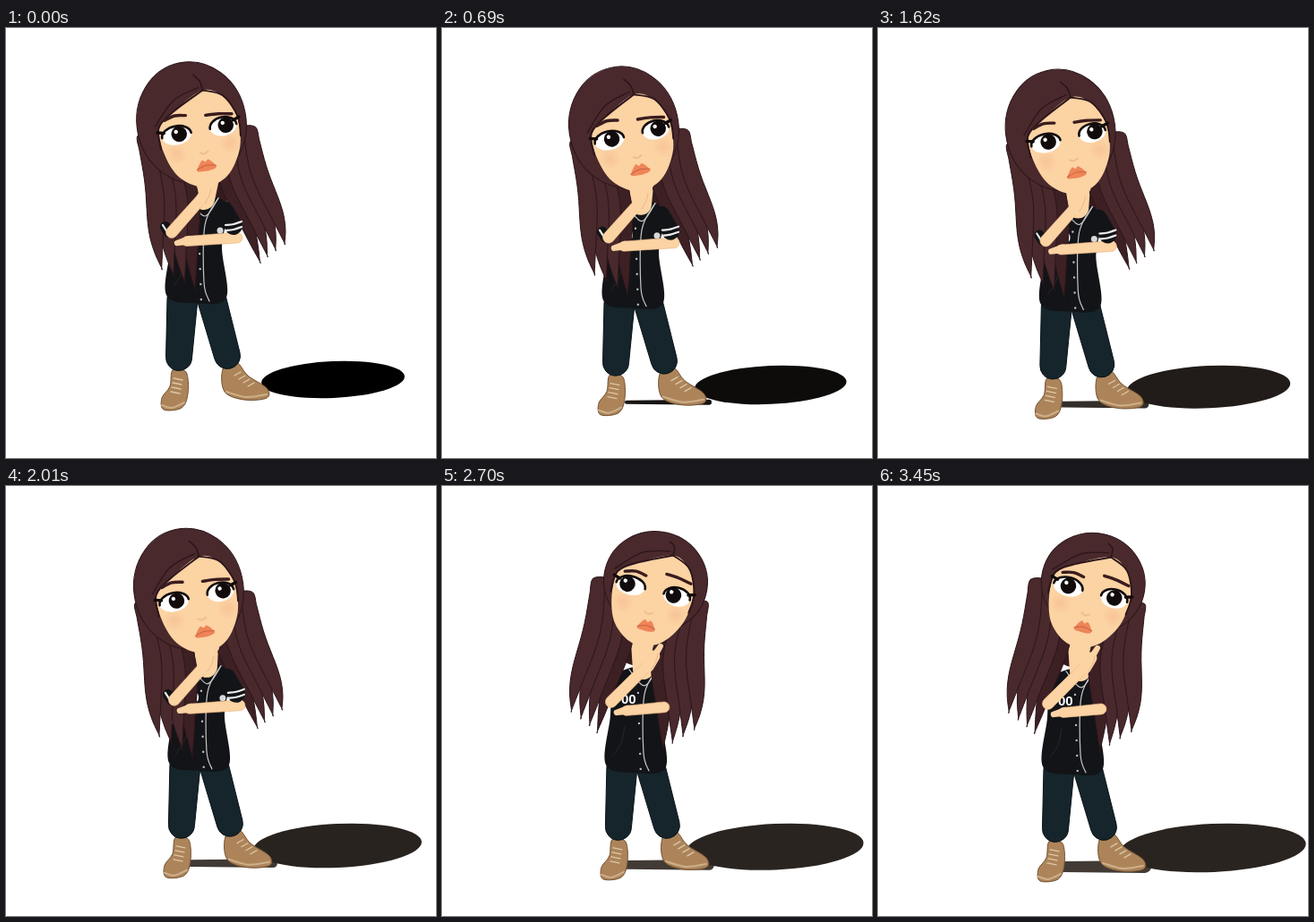
These frames come from a looping animation (480 px wide and 480 px high, 3.48 s). An HTML page with a canvas:

```html
<!DOCTYPE html>
<html lang="en">
<head>
<meta charset="utf-8">
<title>Thinking</title>
<style>
html, body { margin: 0; width: 100%; height: 100%; overflow: hidden; background: #fff; }
canvas { display: block; width: 480px; height: 480px; }
</style>
</head>
<body>
<canvas id="stage" width="480" height="480"></canvas>
<script>
const ctx = document.getElementById("stage").getContext("2d");
const LOOP = 3480, STEP = 30;

const SKIN = "#fcd3a3", SKIN_EDGE = "#e6b585", HAIR = "#49292c", HAIR_DARK = "#2b151a";
const SHIRT = "#131417", PANTS = "#15252b", SHOE = "#ad8459", SHOE_DARK = "#725234";
const INK = "#110b0c";

const lerp = (a, b, k) => a + (b - a) * k;
function ease(t, from, to) {
  const k = Math.max(0, Math.min(1, (t - from) / (to - from)));
  return k * k * (3 - 2 * k);
}

// She sinks and sways slowly, then turns her head to the other side.
function poseAt(t) {
  const p = t / LOOP;
  const sink = 15 * Math.pow(p, 0.6);
  const sway = 2 * Math.cos(2 * Math.PI * t / 1200);
  const turn = ease(t, 2110, 2720);
  const mid = Math.sin(Math.PI * turn);
  return {
    p, turn,
    bodyX: 5 * p, bodyY: sink - 6,
    x: 214 + 22 * turn * turn + sway,
    y: 115 + 0.85 * sink - 8.6 * turn,
    tilt: (-12 + 26 * turn + 0.5 * sway) * Math.PI / 180,
    gaze: 3 - 7 * turn + 4 * ease(t, 3000, LOOP),
    browL: -21 + 5 * turn + 5 * mid,
    browR: -15 - 6 * turn
  };
}

function fromHead(pose, x, y) {
  const c = Math.cos(pose.tilt), s = Math.sin(pose.tilt);
  return [pose.x + x * c - y * s, pose.y + x * s + y * c];
}

function paint(fill, stroke, width = 1) {
  if (fill) { ctx.fillStyle = fill; ctx.fill(); }
  if (stroke) { ctx.strokeStyle = stroke; ctx.lineWidth = width; ctx.stroke(); }
}

// Smooth path through every point.
function trace(p, closed) {
  const n = p.length / 2;
  const at = i => {
    const j = closed ? (i + n) % n : Math.max(0, Math.min(n - 1, i));
    return [p[2 * j], p[2 * j + 1]];
  };
  ctx.beginPath();
  ctx.moveTo(p[0], p[1]);
  for (let i = 0; i < (closed ? n : n - 1); i++) {
    const [a, b, c, d] = [at(i - 1), at(i), at(i + 1), at(i + 2)];
    ctx.bezierCurveTo(b[0] + (c[0] - a[0]) / 6, b[1] + (c[1] - a[1]) / 6,
      c[0] - (d[0] - b[0]) / 6, c[1] - (d[1] - b[1]) / 6, c[0], c[1]);
  }
  if (closed) ctx.closePath();
}

function shape(p, fill, stroke, width) { trace(p, true); paint(fill, stroke, width); }
function line(p, color, width) { trace(p, false); paint(null, color, width); }
function oval(x, y, rx, ry, fill, stroke, width, turn = 0) {
  ctx.beginPath();
  ctx.ellipse(x, y, rx, ry, turn, 0, Math.PI * 2);
  paint(fill, stroke, width);
}

// Tapered capsule from one round end to the other.
function limb(x1, y1, r1, x2, y2, r2, fill, stroke, width) {
  const a = Math.atan2(y2 - y1, x2 - x1), q = Math.PI / 2;
  ctx.beginPath();
  ctx.arc(x1, y1, r1, a + q, a + 3 * q);
  ctx.arc(x2, y2, r2, a - q, a + q);
  ctx.closePath();
  paint(fill, stroke, width);
}

function drawShadow({ p }) {
  const warm = Math.min(1, p * 1.7);
  const shade = (r, g, b) => `rgb(${r * warm},${g * warm},${b * warm})`;
  if (p > 0.03) {
    const y = 416 + 9 * p, r = 1 + 5 * p;
    limb(206, y, r, 298, y, r + 1, shade(66, 58, 53));
  }
  const left = 285 - 15 * p, right = 445 + 33 * p;
  const top = 372 + 5 * Math.min(1, p * 5), bottom = 413 + 18 * Math.pow(p, 0.6);
  oval((left + right) / 2, (top + bottom) / 2, (right - left) / 2, (bottom - top) / 2,
    shade(42, 36, 32), null, 0, -0.045);
}

function drawShoes() {
  shape([186,388, 201,390, 203,414, 196,430, 176,432, 174,419, 183,406], SHOE, SHOE_DARK);
  line([174,427, 185,430, 199,424], "#cdb08a", 2);
  shape([242,387, 257,379, 270,394, 291,408, 291,419, 266,421, 244,412], SHOE, SHOE_DARK);
  line([246,412, 268,418, 291,415], "#cdb08a", 2);
  for (let i = 0; i < 4; i++) {
    line([187 - i, 397 + i * 5, 197 - i, 399 + i * 5], "#dcc9aa", 1.3);
    line([255 + i * 5, 394 + i * 4, 262 + i * 5, 390 + i * 4], "#dcc9aa", 1.3);
  }
}

function drawBody({ turn }) {
  drawShoes();
  limb(197, 308, 17, 193, 374, 14.5, PANTS, "#0a1317");
  limb(230, 310, 16, 247, 372, 14.5, PANTS, "#0a1317");
  limb(196, 210, 9, 187, 228, 11, SHIRT);
  shape([206,196, 187,210, 184,250, 179,304, 212,313, 246,307, 241,250, 248,210, 235,195], SHIRT);
  line([187,294, 196,280, 200,262], "#26282c", 1);
  line([180 + 2 * turn, 227, 196,219], "#f2f2f2", 3);

  line([205,198, 222,216, 237,196], "#c7c7c7", 1.2);
  line([237,196, 222,226, 221,290, 227,311], "#c7c7c7", 1.2);
  for (let y = 224; y < 310; y += 17) oval(215 + (y - 224) / 30, y, 1.2, 1.2, "#b9bcc0");
  ctx.fillStyle = "#fff";
  ctx.font = "bold 15px 'Liberation Sans', sans-serif";
  ctx.fillText("00", 196, 236);
  oval(239, 232, 3.5, 3.5, "#d8d8d8");
}

function drawNeck(pose) {
  const [x, y] = fromHead(pose, 0, 48);
  limb(x, y, 14, 221 + pose.bodyX, 197 + pose.bodyY, 12, SKIN);
}

// A lock is a fan of tapering strands, the innermost one longest and darkest.
function drawLock(root, tip, side) {
  for (let j = 0; j < 4; j++) {
    const s = side * (-0.75 + 0.5 * j), reach = 1 - 0.045 * j;
    const near = [], far = [];
    for (let i = 0; i <= 9; i++) {
      const u = i / 9, v = u * reach;
      const spread = 18 + 8 * Math.sin(Math.PI * Math.min(1, v));
      const wave = 3.5 * Math.sin(7.5 * v + 2.2) * side;
      const x = lerp(root[0], tip[0], v) + wave + s * spread + side * 5 * Math.pow(u, 5);
      const y = lerp(root[1], tip[1], v);
      const half = 0.4 * spread * (1 - Math.pow(u, 5));
      near.push(x - half, y);
      far.unshift(x + half, y);
    }
    shape([...near, ...far], j ? HAIR : "#3c2024", HAIR_DARK, 1);
  }
}

function drawHair(pose) {
  const left = fromHead(pose, -46, -3), right = fromHead(pose, 39, 3), k = pose.turn;
  drawLock(left, [left[0] + lerp(31, -28, k), left[1] + 170], -1);
  drawLock(right, [right[0] + lerp(38, -17, k), right[1] + lerp(150, 163, k)], 1);
}

function inHead(pose, draw) {
  ctx.save();
  ctx.translate(pose.x, pose.y);
  ctx.rotate(pose.tilt);
  draw(pose);
  ctx.restore();
}

function drawNape() { oval(-1, 40, 42, 46, "#351b1f"); }

function drawEye(x, rx, gaze, dir) {
  oval(x, 0, rx, 10.5, "#fff");
  ctx.save();
  ctx.clip();
  oval(x + gaze, -1, 8.7, 8.7, INK);
  oval(x + gaze - 3, -4, 2.2, 2.2, "#fff");
  ctx.restore();
  ctx.beginPath();
  ctx.ellipse(x, 0, rx, 10.5, 0, Math.PI, Math.PI * 2);
  paint(null, INK, 2.6);
  line([x + dir * (rx - 3), -5, x + dir * (rx + 4), -7], INK, 3.4);
}

function drawHead({ turn, gaze, browL, browR }) {
  oval(-7 + 7 * turn, -11, 61 - 3 * turn, 68 - 12 * turn, HAIR, HAIR_DARK, 1);
  shape([12,-44, -24,-27, -43,-13, -44,15, -33,45, -8,62, 21,55, 41,26, 44,-8, 33,-33], SKIN);
  line([12,-44, -24,-27, -44,-12, -46,12], HAIR_DARK, 2);
  line([12,-44, 33,-34, 45,-8, 44,14], HAIR_DARK, 1.8);
  line([12,-44, 11,-54, 5,-63 + 5 * turn], HAIR_DARK, 1.6);
  line([8,-48, -22,-39, -48,-14], HAIR_DARK, 1.3);

  for (const cx of [-30, 31]) {
    const blush = ctx.createRadialGradient(cx, 20, 1, cx, 20, 12);
    blush.addColorStop(0, "rgba(240,165,125,.3)");
    blush.addColorStop(1, "rgba(240,165,125,0)");
    oval(cx, 20, 12, 12, blush);
  }
  drawEye(-26, 16.5, gaze, -1);
  drawEye(27, 15, gaze, 1);
  line([-36, browL + 2, -24, browL - 1, -12, browL + 1], "#3a1c1e", 3.4);
  line([10, browR - 1, 24, browR, 39, browR + 3], "#3a1c1e", 3.4);
  line([-4,24, 0,26, 5,24], "#eebb8c", 1.8);

  const mx = turn * 2, w = 11 - turn;
  shape([mx - w, 43, mx - 4, 33, mx, 35, mx + 4, 33, mx + w, 42, mx + 5, 45, mx - 4, 45], "#ee8558");
  line([mx - w, 42, mx, 39, mx + w, 41], "#c9623f", 1);
}

function drawArms({ turn }) {
  const hx = 221 + 8 * turn, hy = 189 - 4 * turn;
  // Left cuff rests on the hair until the head turns away.
  if (turn < 0.5) {
    limb(178, 228, 6, 182, 234, 6, SHIRT);
    line([175,226, 182,237], "#eee", 2.2);
  }
  limb(185, 234, 6.5, hx - 5, hy + 10, 6, SKIN, SKIN_EDGE, 0.6);
  limb(hx - 3, hy + 9, 7, hx + 4, hy - 2, 6.5, SKIN);
  limb(hx + 3, hy, 4, hx + 11, hy - 13, 3, SKIN);
  line([hx + 8, hy - 4, hx + 6, hy + 4, hx + 1, hy + 13], SKIN_EDGE, 0.9);

  const elbow = lerp(258, 244, turn), reach = lerp(263, 247, turn);
  limb(elbow, 240, 6, 202, 244, 5.5, SKIN, SKIN_EDGE, 0.6);
  limb(204, 243, 5, 191, 246, 3.2, SKIN);

  if (turn < 0.6) {
    limb(244, 208, 9, lerp(254, 241, turn), 227, 10, SHIRT);
    for (const y of [224, 230]) line([245, y + 2, 254, y + 1, reach, y - 2], "#eee", 2.2);
  }
}

function render(t) {
  const pose = poseAt(t);
  const onBody = draw => {
    ctx.save();
    ctx.translate(pose.bodyX, pose.bodyY);
    draw(pose);
    ctx.restore();
  };
  ctx.fillStyle = "#fff";
  ctx.fillRect(0, 0, 480, 480);
  drawShadow(pose);
  inHead(pose, drawNape);
  onBody(drawBody);
  drawNeck(pose);
  drawHair(pose);
  inHead(pose, drawHead);
  onBody(drawArms);
}

ctx.lineJoin = ctx.lineCap = "round";
const start = performance.now();
function tick() {
  const t = (performance.now() - start) % LOOP;
  render(Math.floor(t / STEP) * STEP);
  requestAnimationFrame(tick);
}
tick();
</script>
</body>
</html>
```
